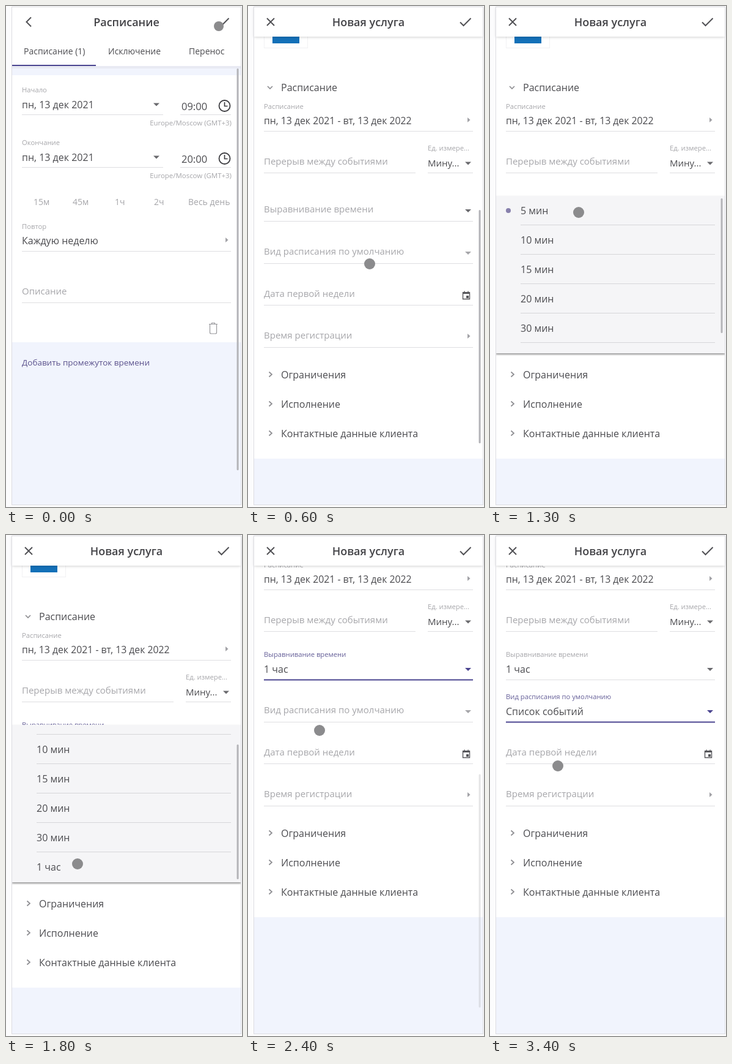
An HTML page for the animation above (3.5 s loop, 386 by 818 pixels).

```html
<!DOCTYPE html>
<html lang="ru">
<head>
<meta charset="utf-8">
<title>Расписание</title>
<style>
  html, body { margin: 0; width: 100%; height: 100%; overflow: hidden; background: #fcfcfd; }
  svg { display: block; width: 386px; height: 818px; font-family: "Open Sans", "Noto Sans", sans-serif; }
</style>
</head>
<body>
<svg id="stage" viewBox="0 0 386 818" xmlns="http://www.w3.org/2000/svg"></svg>
<script>
const LOOP = 3500, STEP = 100;
const INK = '#4c4c50', HINT = '#a6a6aa', RULE = '#dedee1', ACCENT = '#4b4590', PAGE = '#f1f4fd';

// Text is placed by the middle of its capital letters.
const text = (x, y, s, size = 16, fill = INK, extra = '') =>
  `<text x="${x}" y="${y + size * 0.36}" font-size="${size}" fill="${fill}" ${extra}>${s}</text>`;
const hint = (x, y, s) => text(x, y, s, 15, HINT);
const label = (x, y, s, fill = HINT) => text(x, y, s, 11.25, fill);
const title = s => text(197, 27, s, 18, '#434347', 'font-weight="600" text-anchor="middle"');
const rect = (x, y, w, h, fill, extra = '') =>
  `<rect x="${x}" y="${y}" width="${w}" height="${h}" fill="${fill}" ${extra}/>`;
const rule = (y, x1 = 26, x2 = 368, fill = RULE) => rect(x1, y, x2 - x1, 1, fill);
const line = (d, stroke, width) =>
  `<path d="${d}" fill="none" stroke="${stroke}" stroke-width="${width}"/>`;
const down = (x, y, fill = '#6a6a6e') => `<path d="M${x - 5} ${y - 2.5}h10l-5 5z" fill="${fill}"/>`;
const right = (x, y) => `<path d="M${x - 2} ${y - 4}l4.5 4l-4.5 4z" fill="#a2a2a6"/>`;
const group = (id, body, extra = '') => `<g id="${id}" ${extra}>${body}</g>`;
const check = line('M347 26.5l5.5 5.5l12 -12', '#505054', 2);
const scrollbar = (id, y, h) => rect(377.5, y, 3, h, '#b4b4b8', `id="${id}" rx="1.5"`);

const clock = y => `<circle cx="357.5" cy="${y}" r="9" fill="none" stroke="#3c3c40" stroke-width="1.8"/>`
  + line(`M357.5 ${y - 6}v6.5h5`, '#3c3c40', 1.7);

const timeRow = (y, name, time) =>
  label(26, y, name) + text(26, y + 24, 'пн, 13 дек 2021') + down(246, y + 24) + rule(y + 40, 26, 257)
  + text(287, y + 27, time, 16.5) + clock(y + 26) + rule(y + 40, 285, 368)
  + text(369, y + 54, 'Europe/Moscow (GMT+3)', 11.45, HINT, 'text-anchor="end"');

const editor = rect(10, 98, 374, 716, PAGE) + rect(10, 98, 374, 4, '#e8eaf3')
  + rect(10, 113, 374, 436, '#fff') + rect(10, 2, 374, 96, '#fff')
  + line('M41 18.5l-7.5 7.5l7.5 7.5', '#505054', 2) + title('Расписание') + check
  + text(29, 74, 'Расписание (1)', 14) + text(167, 74, 'Исключение', 14) + text(299, 74, 'Перенос', 14)
  + rect(10, 96, 137, 2, ACCENT)
  + timeRow(137, 'Начало', '09:00') + timeRow(223, 'Окончание', '20:00')
  + [[45, '15м'], [109, '45м'], [178, '1ч'], [242, '2ч'], [298, 'Весь день']]
      .map(([x, s]) => text(x, 320, s, 14, HINT)).join('')
  + label(26, 360, 'Повтор') + text(26, 383, 'Каждую неделю') + right(361, 382) + rule(400)
  + hint(26, 466, 'Описание') + rule(484)
  + line('M332 519.5h14M336.5 519v-1.5h5v1.5M333.5 520v13q0 2 2 2h7q2 0 2 -2v-13', '#98989c', 1.2)
  + text(26, 582, 'Добавить промежуток времени', 13.5, '#5a518c')
  + scrollbar('editorBar', 102, 656);

// A select shows a hint while empty, otherwise a floating label and a value.
const select = (id, y, name, value, arrow) =>
  group(id + 'Empty', hint(26, y, name) + down(360, y + 2.5, arrow) + rule(y + 19))
  + group(id + 'Filled', label(26, y - 22, name)
    + group(id + 'Value', text(26, y + 2, value)) + down(360, y + 2.5) + rule(y + 19))
  + group(id + 'Focus', label(26, y - 22, name, '#655f98')
    + group(id + 'FocusValue', text(26, y + 2, value)) + down(360, y + 2.5, ACCENT)
    + rect(26, y + 18.5, 342, 2, ACCENT));

const section = (y, s) => line(`M34.5 ${y - 4.5}l4.5 4l-4.5 4`, '#8e8e92', 1.7) + text(54, y, s);

const calendar = line('M351.5 468h11v10.5h-11zM354 465.5v2M360 465.5v2', '#56565a', 1.4)
  + rect(351, 467, 12, 3, '#56565a') + rect(357, 473, 4, 4, '#56565a');

const form = rect(10, -100, 374, 839, '#fff')
  + rect(26.5, 20, 71, 48.5, '#fff', 'stroke="#f1f1f3"') + rect(40, 20, 44, 41, '#1370b8')
  + line('M32 131l4 4l4 -4', '#8e8e92', 1.7) + text(54, 133, 'Расписание')
  + label(26, 164, 'Расписание') + text(26, 187, 'пн, 13 дек 2021 - вт, 13 дек 2022', 15.8)
  + right(361, 186) + rule(204)
  + hint(26, 254, 'Перерыв между событиями') + rule(272, 26, 274)
  + label(294, 232, 'Ед. измере...') + text(294, 257, 'Мину...', 15) + down(360, 257) + rule(272, 294, 368)
  + select('align', 332, 'Выравнивание времени', '1 час', '#6a6a6e')
  + select('view', 401, 'Вид расписания по умолчанию', 'Список событий', '#a6a6aa')
  + hint(26, 470, 'Дата первой недели') + calendar + rule(488)
  + hint(26, 538, 'Время регистрации') + right(361, 539) + rule(557)
  + section(602, 'Ограничения') + section(650, 'Исполнение') + section(698, 'Контактные данные клиента');

const popup = (id, top, bottom, firstRow, items) => group(id,
  rect(9.5, top, 375, bottom - top, '#f5f5f7', 'filter="url(#shadow)"')
  + group(id + 'List',
      `<circle cx="30" cy="${firstRow}" r="4" fill="#8780ac"/>`
      + items.map((s, i) => text(50, firstRow + 48 * i, s)
        + (i < items.length - 1 ? rule(firstRow + 23 + 48 * i, 50, 368, '#d6d6d9') : '')).join('')),
  `clip-path="url(#${id}Clip)"`);

const clip = (id, y, h, x = 10, w = 374) => `<clipPath id="${id}">${rect(x, y, w, h, '#000')}</clipPath>`;

document.getElementById('stage').innerHTML = `<defs>
  <filter id="shadow" x="-5%" y="-10%" width="110%" height="125%">
    <feDropShadow dx="0" dy="2" stdDeviation="1.8" flood-color="#000" flood-opacity=".42"/></filter>
  <filter id="soft" x="-5%" y="-10%" width="110%" height="140%">
    <feDropShadow dx="0" dy="1" stdDeviation="2" flood-color="#000" flood-opacity=".18"/></filter>
  ${clip('body', 49, 765)}${clip('alignMenuClip', 308, 266, 9, 376)}${clip('viewMenuClip', 261, 155, 9, 376)}
  ${clip('rows', 310, 256)}
  </defs>`
  + rect(0, 0, 386, 818, '#fcfcfd')
  + group('editor', editor)
  + group('service',
      rect(10, 49, 374, 765, PAGE)
      + `<g clip-path="url(#body)">${group('form', form)}</g>`
      + scrollbar('formBar', 333, 381)
      + popup('alignMenu', 310, 567, 334, ['5 мин', '10 мин', '15 мин', '20 мин', '30 мин', '1 час'])
      + scrollbar('menuBar', 314, 220)
      + popup('viewMenu', 264, 408, 288, ['День', 'Афиша', 'Список событий'])
      + `<g clip-path="url(#top)">${rect(10, 2, 374, 48, '#fff', 'filter="url(#soft)"')}</g>`
      + line('M31 20l12 12M43 20l-12 12', '#505054', 1.9) + title('Новая услуга') + check)
  + rect(9.5, 1.5, 375, 813, 'none', 'stroke="#dddde2"')
  + '<circle id="touch" r="9" fill="#8b8b8d"/>';

const el = {};
document.querySelectorAll('#stage [id]').forEach(node => el[node.id] = node);
const alignRows = el.alignMenuList;
const rowsFrame = document.createElementNS('http://www.w3.org/2000/svg', 'g');
rowsFrame.setAttribute('clip-path', 'url(#rows)');
alignRows.replaceWith(rowsFrame);
rowsFrame.append(alignRows);

const set = (id, attrs) => Object.entries(attrs).forEach(([k, v]) => el[id].setAttribute(k, v));
const show = (id, on) => set(id, { visibility: on ? 'inherit' : 'hidden' });
const ramp = (t, from, to) => Math.min(1, Math.max(0, (t - from) / (to - from)));
const ease = p => p * p * (3 - 2 * p);

const path = [
  [0, 348, 33], [100, 348, 33], [600, 199, 421], [700, 199, 421], [1100, 145, 337],
  [1400, 145, 337], [1800, 117, 537], [2000, 117, 537], [2400, 117, 319],
  [2700, 121, 288], [2900, 121, 288], [3200, 115, 384], [3300, 115, 384], [3400, 111, 377]
];

function touchAt(t) {
  const i = path.findIndex(p => p[0] >= t);
  if (i <= 0) return path[0].slice(1);
  const [t0, x0, y0] = path[i - 1], [t1, x1, y1] = path[i];
  const p = ease(ramp(t, t0, t1));
  return [x0 + (x1 - x0) * p, y0 + (y1 - y0) * p];
}

function showSelect(id, empty, focused, filled) {
  show(id + 'Empty', empty);
  show(id + 'Focus', !empty && focused);
  show(id + 'Filled', !empty && !focused);
  show(id + 'Value', filled && !focused);
  show(id + 'FocusValue', filled && focused);
}

function render(t) {
  const scroll = 115 * ease(ramp(t, 2000, 2400));
  const rows = 32 * ease(ramp(t, 1400, 1800));
  const menuOpen = t >= 1300 && t < 2000;
  const viewOpen = t >= 2800 && t < 3300;

  show('editor', t < 200);
  show('service', t >= 200);
  set('form', { transform: `translate(0 ${-scroll})` });
  set('formBar', {
    y: 333 + scroll / 2,
    opacity: t < 2000 ? 1 - ramp(t, 600, 900) : 1 - 0.65 * ramp(t, 2200, 2400) - 0.35 * ramp(t, 2400, 2600)
  });

  showSelect('align', t < 1400, t < 2800, t >= 2000);
  showSelect('view', t < 2800, true, t >= 3300);

  show('alignMenu', menuOpen);
  show('menuBar', menuOpen);
  show('viewMenu', viewOpen);
  set('alignMenuList', { transform: `translate(0 ${-rows})` });
  set('menuBar', { y: 314 + rows * 0.875 });

  const [cx, cy] = touchAt(t);
  set('touch', { cx, cy, r: t < 200 ? 8 : 9 });
}

function tick(now) {
  render(Math.floor(now % LOOP / STEP) * STEP);
  requestAnimationFrame(tick);
}
render(0);
requestAnimationFrame(tick);
</script>
</body>
</html>
```
